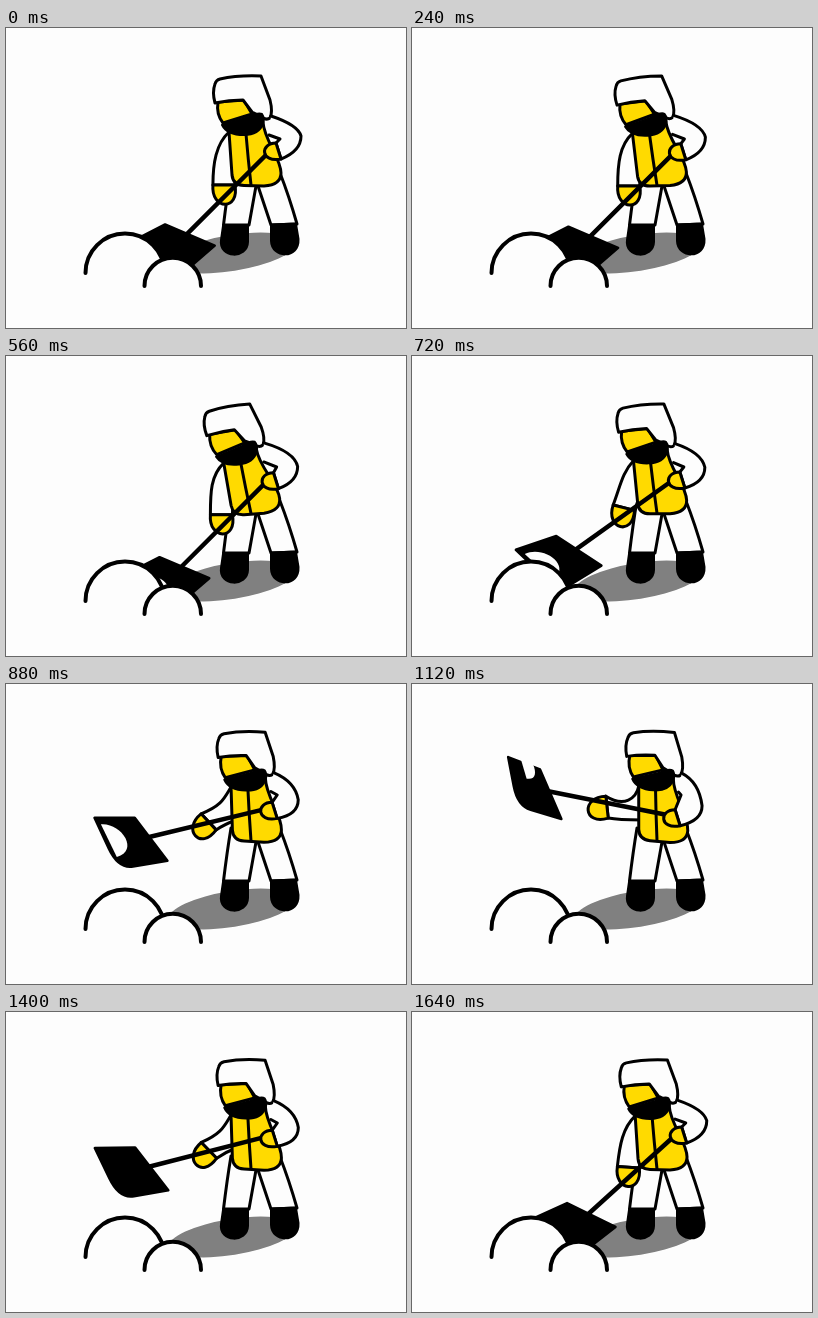
An HTML page with a canvas for the animation above (1.68 s loop, 400 px wide and 300 px high).

```html
<!DOCTYPE html>
<html lang="en">
<head>
<meta charset="utf-8">
<title>Shovelling snow</title>
<style>
  html, body { margin: 0; width: 100%; height: 100%; overflow: hidden; background: #fdfdfd; }
  canvas { display: block; }
</style>
</head>
<body>
<canvas id="stage" width="400" height="300"></canvas>
<script>
const ctx = document.getElementById('stage').getContext('2d');
const WHITE = '#fdfdfd', YELLOW = '#ffda00', BLACK = '#000';
const LOOP = 1680, STEP = 40;
const HIP = [250, 157];

const rad = deg => deg * Math.PI / 180;
const mix = (p, q, k) => [p[0] + (q[0] - p[0]) * k, p[1] + (q[1] - p[1]) * k];
const polar = ([x, y], length, deg) => [x + length * Math.cos(rad(deg)), y + length * Math.sin(rad(deg))];

function ease(t, start, end) {
  const u = Math.min(1, Math.max(0, (t - start) / (end - start)));
  return (1 - Math.cos(Math.PI * u)) / 2;
}

function turn([x, y], deg, [cx, cy]) {
  const c = Math.cos(rad(deg)), s = Math.sin(rad(deg));
  return [cx + x * c - y * s, cy + x * s + y * c];
}

function shape(d, fill, width = 3) {
  const path = new Path2D(d);
  if (fill) { ctx.fillStyle = fill; ctx.fill(path); }
  if (width) { ctx.lineWidth = width; ctx.stroke(path); }
}

function drawLegs() {
  ctx.fillStyle = '#808080';
  ctx.beginPath();
  ctx.ellipse(226, 225, 64, 18, rad(-9), 0, 7);
  ctx.fill();
  shape('M225 144Q221 168 217.5 197L243 197L250 158Z', WHITE);
  shape('M252 158L265 197L291 196Q283 168 274 145Z', WHITE);
  shape('M217.5 198L241.5 197.5L241.5 214C241 231 213 230 215.5 212Z', BLACK);
  shape('M265.5 197L289.5 196L292 211C293 231 266 230 265.5 213Z', BLACK);
}

function drawBody(lean) {
  ctx.save();
  ctx.translate(...HIP);
  ctx.rotate(rad(lean));
  ctx.translate(-HIP[0], -HIP[1]);
  shape('M223 104L226 147Q227 157 238 157.5L258 158Q275 157 275 145C275 130 258 112 257 94L236 100Z', YELLOW);
  shape('M240 106Q242 130 245 157');
  shape('M212 74L238 72L246 86L217 95Q210 86 212 74Z', YELLOW);
  shape('M209 56Q210 52 214 51Q232 47 255 48L264 72Q267 84 264 90Q260 93 254 88L246 84L237 72Q223 72 209 75Q206 64 209 56Z', WHITE);
  shape('M216 97Q230 93 243 89Q252 84 256 86Q259 90 257 96Q253 107 238 107Q221 107 216 97Z', BLACK, 2);
  ctx.restore();
}

function drawFrontSleeve(shoulder, cuff, angle) {
  const top = turn([-11, 0], angle, cuff), bottom = turn([11, 0], angle, cuff);
  const c1 = [shoulder[0] - 13 + angle / 8, shoulder[1] + 12];
  const c2 = turn([0, -22], angle * 1.45, top), c3 = turn([0, -10], angle * 1.2, bottom);
  shape(`M${shoulder}C${c1} ${c2} ${top}L${bottom}Q${c3} 230 136`, WHITE);
}

function drawFrontHand(cuff, angle) {
  const at = (x, y) => turn([x, y], angle, cuff);
  shape(`M${at(-11, 0)}C${at(-13, 25)} ${at(16, 26)} ${at(11, 0)}Z`, YELLOW);
}

function drawRearArm(shoulder, armpit, [x, y], [ex, ey]) {
  const top = [x + 3, y - 8], bottom = [x + 8, y + 8];
  shape(`M${armpit}L${ex - 21} 111L${top}L${bottom}Q${ex} ${ey + 15} ${ex} ${ey}
    Q${ex - 3} ${shoulder[1] + 9} ${shoulder}`, WHITE);
  shape(`M${top}C${x - 13} ${y - 8} ${x - 13} ${y + 12} ${bottom}Z`, YELLOW);
}

function drawBlade(neck, angle, lift, t) {
  const tilt = 23 + 22 * lift * (3 - lift);
  const heel = polar(neck, -24, tilt), side = polar(neck, 30, tilt);
  const tip = polar(heel, 43 - 9 * lift * lift, angle + 18 - 8 * lift);
  const toe = polar(polar(tip, 54, tilt), 12, 80 + 105 * lift);
  shape(`M${tip}L${heel}L${side}L${mix(toe, side, .3)}Q${toe} ${mix(toe, tip, .4)}Z`, BLACK, 2.5);

  // Snow gathers along the tip, then slides off the upper side
  const load = ease(t, 100, 420), slide = Math.max(0, (t - 880) / 240);
  if (!load || slide > 1.4) return;
  const at = (u, v) => {
    u -= .45 * slide * slide;
    v = v * load + .35 * slide;
    return mix(mix(tip, toe, u), mix(heel, side, u), v);
  };
  shape(`M${at(.13, .08)}C${at(.1, .58)} ${at(.7, .62)} ${at(.78, .08)}Z`, WHITE, 0);
}

function draw(t) {
  const push = ease(t, 100, 420) - ease(t, 440, 900);
  const lift = ease(t, 560, 1160) - ease(t, 1100, 1730);
  const lean = 4 * lift - 7 * push;
  const leaned = (x, y) => turn([x - HIP[0], y - HIP[1]], lean, HIP);

  // The shovel swings about the rear hand and carries the front hand along
  const grip = [266 - 3 * push - 7 * lift, 121 + 2 * push + 11 * lift * lift];
  const elbow = [295 - 4 * push - 5 * lift, 108 + 3 * push + 14 * lift];
  const angle = 135 + 57 * lift, wrist = 85 * lift;
  const neck = polar(grip, 120 + 5 * push + 4 * lift, angle);
  const cuff = turn([5 * lift, 10 * lift - 12], wrist, polar(grip, 68, angle));

  ctx.fillStyle = WHITE;
  ctx.fillRect(0, 0, 400, 300);
  ctx.strokeStyle = BLACK;
  ctx.lineCap = ctx.lineJoin = 'round';

  drawLegs();
  drawFrontSleeve(leaned(223, 104), cuff, wrist);
  drawBody(lean);
  drawFrontHand(cuff, wrist);
  shape(`M${neck}L${grip}`, null, 4.5);
  drawRearArm(leaned(265, 88), leaned(263, 107), [grip[0] + 1, grip[1] + 2], elbow);
  drawBlade(neck, angle, lift, t);
  shape('M79.5 245A39.5 39.5 0 0 1 158.5 245', WHITE, 4);
  shape('M138.5 258A28.2 28.2 0 0 1 195 258', WHITE, 4);
}

function frame() {
  draw(Math.floor(performance.now() % LOOP / STEP) * STEP);
  requestAnimationFrame(frame);
}
frame();
</script>
</body>
</html>
```
